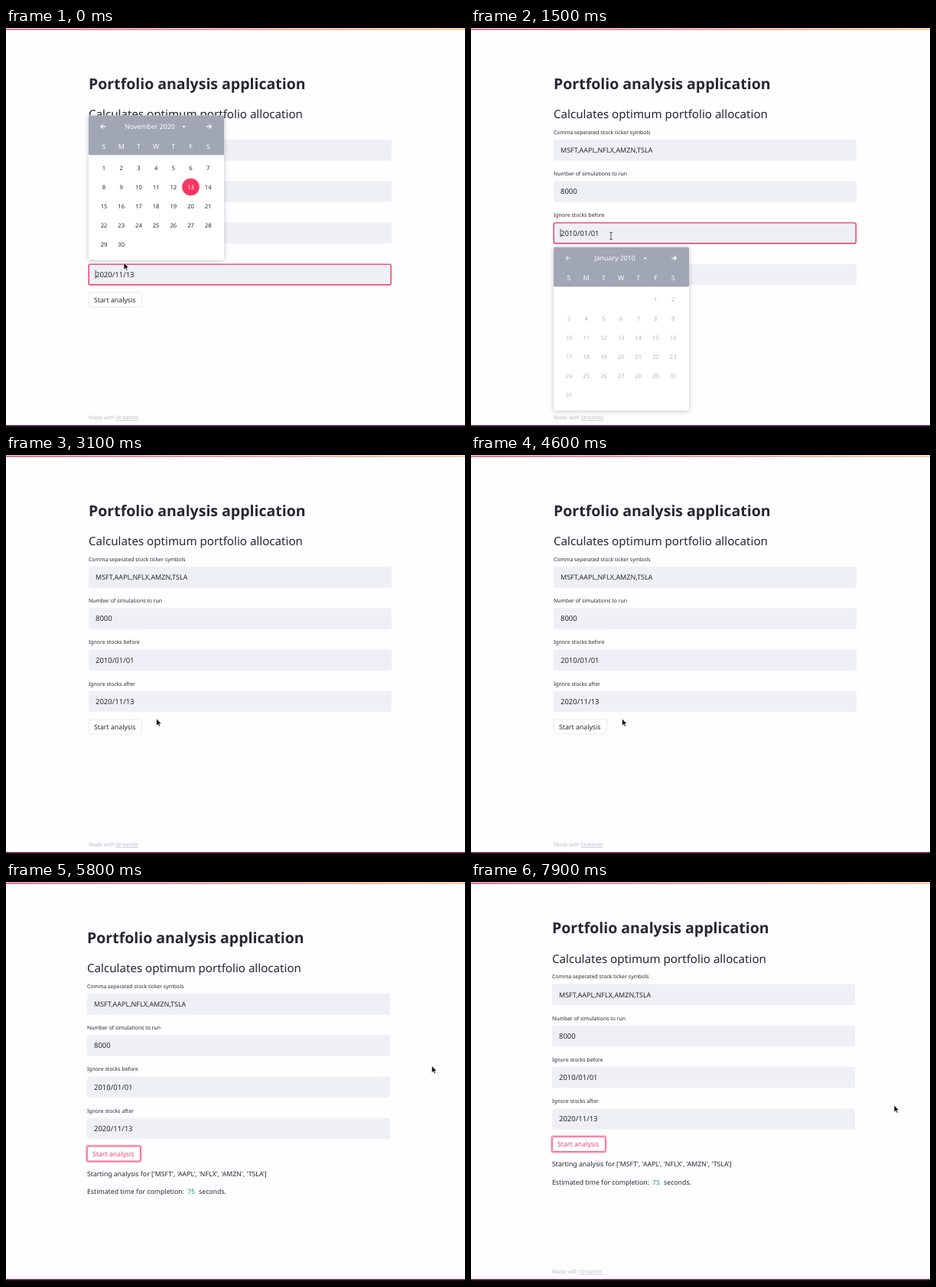
Recreate the animation shown at these times as an HTML page. Size 600x522 px, loop 8 s.

```html
<!DOCTYPE html>
<html lang="en">
<head>
<meta charset="utf-8">
<title>Portfolio analysis application</title>
<style>
html, body { margin: 0; width: 100%; height: 100%; overflow: hidden; background: #fefdff; }
svg { display: block; width: 600px; height: 522px; }
text { font-family: "Noto Sans", "Open Sans", sans-serif; font-size: 8.75px; fill: #262730; white-space: pre; text-rendering: geometricPrecision; }
.title { font-size: 19.5px; font-weight: 700; }
.subtitle { font-size: 15.13px; }
.label { font-size: 6.9px; }
.number { font-size: 9.5px; }
.ticker { font-size: 8.98px; }
.code { font-family: "Noto Sans Mono", monospace; font-size: 8.3px; fill: #21a95a; }
.footer { font-size: 6.88px; fill: #bcbdc6; }
.mid { text-anchor: middle; }
.head { fill: #fff; }
.day { font-size: 7.6px; }
.off { fill: #b4b6bf; }
.calendar { filter: drop-shadow(0 1px 3px rgba(0, 0, 0, .22)); }
</style>
</head>
<body>
<svg id="stage" viewBox="0 0 600 522">
  <defs>
    <linearGradient id="strip"><stop stop-color="#de4a70"/><stop offset="1" stop-color="#f6bd8e"/></linearGradient>
  </defs>
</svg>
<script>
const NS = "http://www.w3.org/2000/svg";
const LOOP = 8000, STEP = 100;
const ACCENT = "#ea3860";
const stage = document.getElementById("stage");

function add(parent, tag, attrs = {}, content) {
  const node = document.createElementNS(NS, tag);
  for (const key in attrs) node.setAttribute(key, attrs[key]);
  if (content !== undefined) node.textContent = content;
  parent.append(node);
  return node;
}
const text = (parent, x, y, content, cls = "") => add(parent, "text", { x, y, class: cls }, content);
const rect = (parent, x, y, width, height, fill, more = {}) =>
  add(parent, "rect", { x, y, width, height, fill, ...more });
const show = (node, on) => { node.style.display = on ? "" : "none"; };

const page = add(stage, "g");
text(page, 108, 79.5, "Portfolio analysis application", "title");
text(page, 108, 118, "Calculates optimum portfolio allocation", "subtitle");

const focusRings = [
  ["Comma seperated stock ticker symbols", "MSFT,AAPL,NFLX,AMZN,TSLA", "ticker"],
  ["Number of simulations to run", "8000", "number"],
  ["Ignore stocks before", "2010/01/01", "number"],
  ["Ignore stocks after", "2020/11/13", "number"]
].map(([label, value, cls], i) => {
  const y = 146 + i * 54.25;
  text(page, 108, y - 7.2, label, "label");
  rect(page, 108, y, 396, 27.5, "#eff0f5", { rx: 2 });
  text(page, 117, y + 17, value, cls);
  const ring = add(page, "g");
  rect(ring, 108.2, y + .4, 395, 26.8, "none", { rx: 2, stroke: ACCENT, "stroke-width": 1.4 });
  rect(ring, 116.6, y + 8.2, .8, 11, "#262730");
  return ring;
});

const glow = rect(page, 107.6, 345.2, 70.6, 20.6, "none", { rx: 2.5, stroke: "#f9a9bd", "stroke-width": 3 });
const button = rect(page, 108.3, 346, 69.2, 19, "#fff", { rx: 2, "stroke-width": .8 });
const buttonText = text(page, 115, 358.6, "Start analysis");

const started = add(page, "g");
text(started, 108, 384.5, "Starting analysis for ['MSFT', 'AAPL', 'NFLX', 'AMZN', 'TSLA']");
const estimate = add(page, "g");
text(estimate, 108, 408, "Estimated time for completion:");
rect(estimate, 236.5, 399, 14.5, 12, "#f7f9fa", { rx: 2 });
text(estimate, 239, 408, "75", "code");
text(estimate, 254, 408, "seconds.");

const footer = text(page, 108, 512, "Made with ", "footer");
add(footer, "tspan", { "text-decoration": "underline" }, "Streamlit");

function calendar(top, month, firstDay, days, height, selected) {
  const g = add(page, "g", { class: "calendar" });
  const past = !selected;
  rect(g, 108, top, 177, height, "#fff", { rx: 1.5 });
  rect(g, 108, top, 177, 51.7, "#a1a6b4", { rx: 1.5 });
  text(g, 188, top + 17.5, month, "mid head");
  const caretX = past ? 227.7 : 232.5;
  add(g, "path", { d: `M${caretX - 2.2} ${top + 13.6}h4.4l-2.2 2.4z`, fill: "#fff" });
  const arrow = (x, flip, opacity) => add(g, "path", {
    d: "M3.3 0H-3M-.3 -2.7L-3 0L-.3 2.7", transform: `translate(${x} ${top + 14.3}) scale(${flip} 1)`,
    fill: "none", stroke: "#fff", "stroke-width": 1.3, opacity
  });
  arrow(127, 1, past ? .65 : 1);
  arrow(265.3, -1, 1);
  const columnX = i => 128 + 22.7 * i;
  [..."SMTWTFS"].forEach((letter, i) => text(g, columnX(i), top + 43.3, letter, "mid head"));
  for (let day = 1; day <= days; day++) {
    const cell = firstDay + day - 1;
    const x = columnX(cell % 7), y = top + 68.4 + 25 * Math.floor(cell / 7);
    if (day === selected) add(g, "circle", { cx: x, cy: y, r: 11.3, fill: "#fb3561" });
    text(g, x, y + 2.7, day, "mid day" + (day === selected ? " head" : past ? " off" : ""));
  }
  return g;
}
const november = calendar(114.6, "November 2020", 0, 30, 189, 13);
const january = calendar(286.8, "January 2010", 5, 31, 213.7);

rect(stage, 0, .8, 600, 1.7, "url(#strip)");
rect(stage, 0, 519.6, 600, 2.4, "#3b0b2e");

const pointer = add(stage, "g");
const arrowShape = add(pointer, "path", {
  d: "M0 0V9.2L2.1 7.3 3.5 10.3 5 9.6 3.6 6.7H6.5Z", fill: "#111", stroke: "#fff", "stroke-width": .6
});
const beamShape = add(pointer, "path", {
  d: "M-2 -4.3H2M0 -4.3V4.3M-2 4.3H2", fill: "none", stroke: "#444", "stroke-width": .9
});

// time, x, y
const pointerPath = [
  [0, 154, 307], [500, 200, 352], [800, 200, 352], [1200, 183, 272], [2100, 183, 272],
  [2400, 292, 342], [2600, 292, 342], [2900, 196.7, 345], [4500, 196.7, 345],
  [4600, 197.5, 345], [4700, 197.5, 345], [5000, 152, 354], [5200, 152, 354],
  [5600, 535, 250], [5800, 556.6, 240.5], [6000, 556.6, 240.5], [6500, 555, 254.5],
  [6700, 555, 254.5], [7400, 553.5, 291], [7700, 553, 292], [8000, 553, 292]
];

function pointerAt(t) {
  const i = pointerPath.findIndex(key => key[0] > t);
  const [t0, x0, y0] = pointerPath[i - 1], [t1, x1, y1] = pointerPath[i];
  const k = (t - t0) / (t1 - t0), eased = k * k * (3 - 2 * k);
  return [x0 + (x1 - x0) * eased, y0 + (y1 - y0) * eased];
}

function render(t) {
  const afterOpen = t < 700, beforeOpen = t >= 1300 && t < 2500;
  const running = t >= 5200, active = t >= 5000;
  show(november, afterOpen);
  show(january, beforeOpen);
  focusRings.forEach((ring, i) => show(ring, i === 3 ? afterOpen : i === 2 && beforeOpen));
  show(glow, t >= 5100);
  button.setAttribute("stroke", active ? "#f0406d" : "#e4e6ec");
  buttonText.style.fill = active ? "#e8466c" : "";
  show(started, running);
  show(estimate, t >= 5300);
  footer.setAttribute("y", running ? 524.5 : 512);
  const scroll = 12.5 * Math.min(1, Math.max(0, (t - 6100) / 200));
  page.setAttribute("transform", `translate(${running ? -2 : 0} ${-scroll})`);
  pointer.setAttribute("transform", `translate(${pointerAt(t)})`);
  const beam = t >= 1100 && t < 2200;
  show(beamShape, beam);
  show(arrowShape, !beam);
}

const start = performance.now();
function tick() {
  const elapsed = Math.max(0, performance.now() - start) % LOOP;
  render(Math.floor(elapsed / STEP) * STEP);
  requestAnimationFrame(tick);
}
tick();
</script>
</body>
</html>
```
